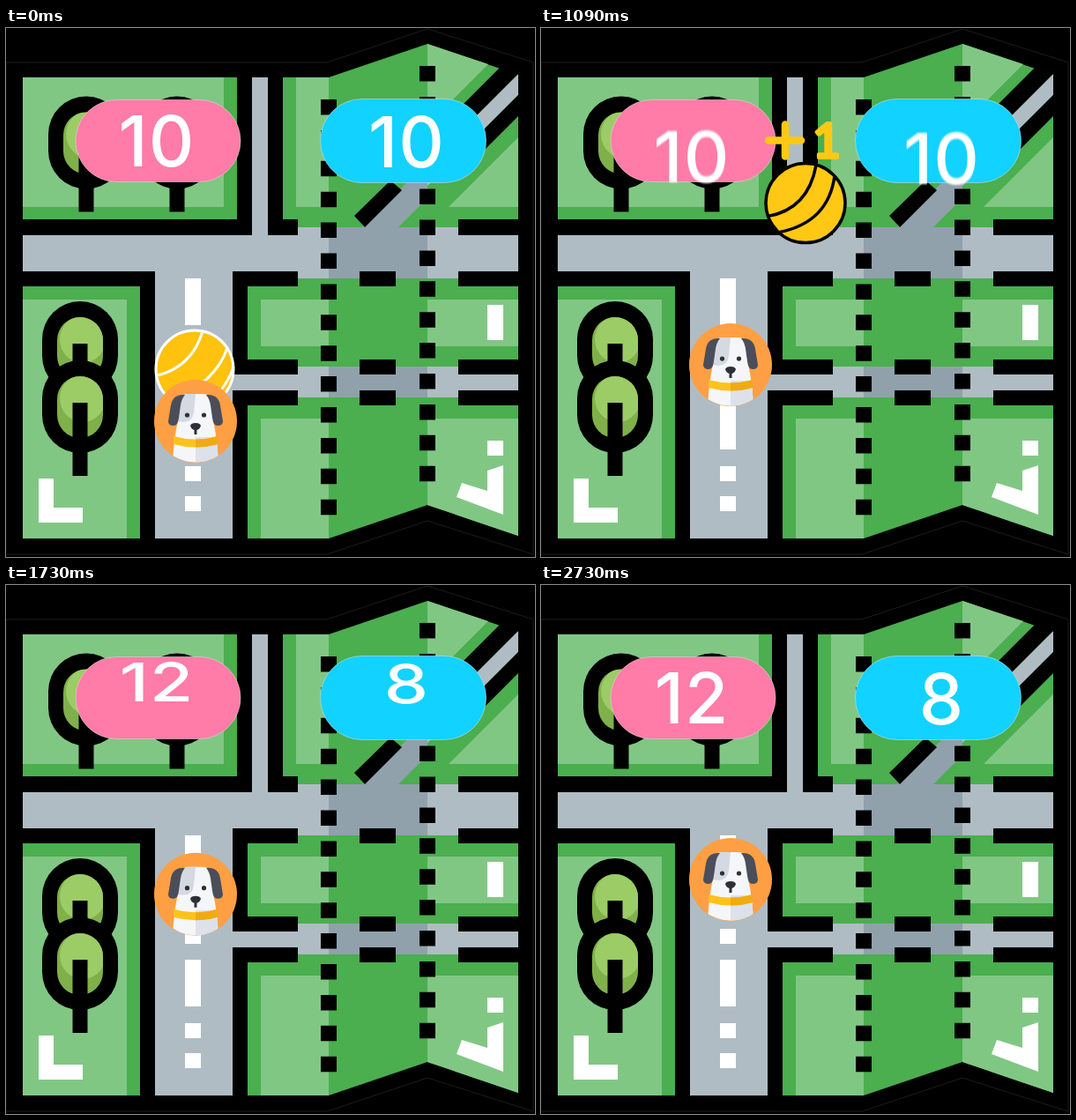
An HTML page for the animation above (2760 ms loop, 600 by 600 pixels).

```html
<!DOCTYPE html>
<html lang="en">
<head>
<meta charset="utf-8">
<title>Map score</title>
<style>
  html, body { margin: 0; width: 100%; height: 100%; overflow: hidden; background: #000; }
  svg { display: block; width: 100vw; height: 100vh; }
  .score text { font: 500 80px Inter, sans-serif; letter-spacing: 1px; fill: #fff; text-anchor: middle; }
  .dark { fill: #4bae4f; }
  .light { fill: #81c784; }
  .road { fill: #b0bcc4; }
  .shade { fill: #90a1ac; }
</style>
</head>
<body>
<svg viewBox="0 0 600 600">
  <defs>
    <filter id="blur" filterUnits="userSpaceOnUse" x="0" y="-300" width="600" height="1700">
      <feGaussianBlur id="blurY" stdDeviation="0 0"/>
    </filter>
    <clipPath id="badge"><circle r="46.5"/></clipPath>
    <clipPath id="crown"><rect x="-26" y="-34" width="52" height="70" rx="26"/></clipPath>
    <g id="tree">
      <rect x="-43" y="-52" width="86" height="105" rx="43"/>
      <g clip-path="url(#crown)">
        <rect x="-26" y="-34" width="52" height="70" fill="#80b04a"/>
        <ellipse cx="3" cy="-9" rx="26" ry="27" fill="#9ccc65"/>
      </g>
      <path d="M-8.500 -4H8.500V79H-8.500z"/>
    </g>
  </defs>
  <rect width="600" height="600"/>
  <path d="M0 597V39H364L478 1L598 39V597L478 559L364 597z" stroke="#1c1c1c"/>

  <path class="dark" d="M19 56H262V217H19zM314 56H366V226H314zM19 293H152V579H19zM274 284H366V384H274zM274 419H366V579H274z
    M366 56L478 18V541L366 579zM478 18L581 53V576L478 541z"/>
  <path class="light" d="M19 56H247V203H19zM329 56H366V203H329zM19 308H137V579H19zM289 308H366V361H289zM289 443H366V579H289z
    M478 18L547 41L478 110zM581 124V203H502zM478 308H581V361H478zM478 443H581V576L478 541z"/>
  <path class="road" d="M19 235H331V226H366V284H331V276H257V579H169V276H19zM279 56H297V235H279zM257 393H331V384H366V419H331V411H257z
    M478 226H513V235H581V276H513V284H478zM478 384H513V393H581V411H513V419H478zM478 155L581 52V76L478 179z"/>
  <path class="shade" d="M366 226H478V284H366zM366 384H478V419H366zM404 226L478 152V193L445 226z"/>
  <path d="M19 217H262V56H279V235H19zM297 56H314V217H331V235H297zM19 276H169V579H152V293H19z
    M257 276H331V293H274V376H331V393H257zM257 411H331V428H274V579H257z
    M513 217H581V235H513zM513 276H581V293H513zM513 376H581V393H513zM513 411H581V428H513z
    M401 276H442V293H401zM401 376H442V393H401zM401 411H442V428H401z
    M500 105L560 45L581 52L512 121zM505 152L581 76V100L517 164zM395 213L436 173L449 184L407 226z"/>
  <path d="M366 81V560M478 43V530" fill="none" stroke="#000" stroke-width="18" stroke-dasharray="17.5 17.4"/>

  <use href="#tree" x="91" y="129.500"/>
  <use href="#tree" x="194" y="129.500"/>
  <use href="#tree" x="84" y="362"/>
  <use href="#tree" x="84" y="429"/>
  <path fill="#fff" d="M203 284h18v53h-18zM203 356h18v17h-18zM203 390h18v17h-18zM203 425h18v53h-18zM203 497h18v17h-18zM203 531h18v17h-18z
    M37 511H54V544H87V561H37zM546 314h18v40h-18zM546 468h18v17h-18zM517 516L546 525V502L564 496V552L511 532z"/>

  <g stroke="#ddd" stroke-opacity=".55">
    <rect x="79" y="81.500" width="187" height="93" rx="46.500" fill="#ff7ba8"/>
    <rect x="356.500" y="80.500" width="188" height="95" rx="47.500" fill="#12d2ff"/>
  </g>

  <g id="roadBall" transform="translate(214 387)" fill="#ffc20e" stroke="#fff" stroke-width="3">
    <circle r="44"/>
    <path fill="none" d="M-42 7Q-3 -3 9 -43M-25 36Q24 14 37 -24M10 42Q35 25 44 -3"/>
  </g>

  <g id="dog">
    <circle r="47" fill="#ff9f43"/>
    <g clip-path="url(#badge)">
      <path fill="#f5f6f9" d="M-26 50Q-25 20 -20 0V-18Q-20 -31 -8 -31H8Q20 -31 20 -18V0Q25 20 26 50z"/>
      <path fill="#dde1e9" d="M0 18H24L26 50H0z"/>
      <path fill="#d5d9e1" d="M0 -31H-8Q-20 -31 -20 -18V0Q-4 4 -2 -10z"/>
      <path fill="#4a4e5a" d="M-12 -30Q-26 -31 -28 -18L-31 0Q-31 5 -25 5Q-20 5 -19 -4L-17 -18Q-16 -25 -12 -30zM12 -30Q26 -31 28 -18L31 0Q31 5 25 5Q20 5 19 -4L17 -18Q16 -25 12 -30z"/>
      <path fill="#ffc21a" d="M-25 17Q0 24 25 17V26Q0 33 -25 26z"/>
      <path fill="#f0ab12" d="M0 20.500Q13 20.500 25 17V26Q13 29.500 0 29.500z"/>
      <g fill="#2e3038">
        <circle cx="-9.500" cy="-7" r="2.600"/>
        <circle cx="9.500" cy="-7" r="2.600"/>
        <path d="M-6 5Q-5 2 0 2Q5 2 6 5Q5 9 1.500 10V15H-1.500V10Q-5 9 -6 5z"/>
      </g>
    </g>
  </g>

  <g id="bonus" fill="#ffc814">
    <path d="M-42 -71H-5M-23 -89V-53" fill="none" stroke="#ffc814" stroke-width="8.500" stroke-linecap="round"/>
    <text x="24" y="-51.500" text-anchor="middle" font-family="Lato, sans-serif" font-size="55" font-weight="400"
      stroke="#ffc814" stroke-width="4" stroke-linejoin="round">1</text>
    <g stroke="#000" stroke-width="3.500">
      <circle r="45"/>
      <path fill="none" d="M-43 15Q3 7 12 -43M-30 33Q26 22 33 -31"/>
    </g>
  </g>

  <g id="scores" class="score">
    <g data-x="171" data-y="0"><text y="29"></text></g>
    <g data-x="454.500" data-y="1.500"><text y="29"></text></g>
  </g>
</svg>
<script>
const LOOP = 2760;
const $ = id => document.getElementById(id);
const span = (t, a, b) => Math.min(1, Math.max(0, (t - a) / (b - a)));
const sine = p => (1 - Math.cos(Math.PI * p)) / 2;
const move = (el, x, y, sy = 1) => el.setAttribute('transform', `translate(${x} ${y}) scale(1 ${sy})`);

// Score motion: [time, centre y, vertical stretch, vertical blur]
const drop = [
  [1000, 127.5, 1, 0], [1090, 145.5, 1, 1], [1210, 205, 1.5, 8], [1330, 380, 4, 35],
  [1450, 655, 7, 80], [1510, 960, 7, 80],
  [1570, 560, 6, 60], [1630, 210, 2.6, 16], [1690, 108, 0.72, 0], [1730, 110, 0.76, 0],
  [1850, 131, 1.03, 0], [1960, 127.5, 1, 0]
];

function sample(rows, t) {
  const i = rows.findIndex(r => r[0] >= t);
  if (i < 0) return rows[rows.length - 1];
  if (i === 0) return rows[0];
  const a = rows[i - 1], b = rows[i], p = span(t, a[0], b[0]);
  return a.map((v, k) => v + (b[k] - v) * p);
}

const scores = [...$('scores').children];

function draw(t) {
  move($('dog'), 215, 446 - 55 * sine(span(t, 0, 620)) - 57 * sine(span(t, 650, 2350)));
  $('roadBall').setAttribute('visibility', t < 780 ? 'visible' : 'hidden');

  move($('bonus'), 300, 246 - 421 * (1 - span(t, 760, 1400)) ** 3);
  $('bonus').setAttribute('opacity', t < 760 ? 0 : 1 - span(t, 1500, 1640));

  const [, y, stretch, blur] = sample(drop, t);
  const values = t < 1510 ? ['10', '10'] : ['12', '8'];
  scores.forEach((g, i) => {
    move(g, g.dataset.x, y + Number(g.dataset.y), stretch);
    g.firstChild.textContent = values[i];
  });
  $('blurY').setAttribute('stdDeviation', `0 ${blur}`);
  if (blur > 0) $('scores').setAttribute('filter', 'url(#blur)');
  else $('scores').removeAttribute('filter');
}

const start = performance.now();
function tick() {
  draw((performance.now() - start) % LOOP);
  requestAnimationFrame(tick);
}
tick();
</script>
</body>
</html>
```
